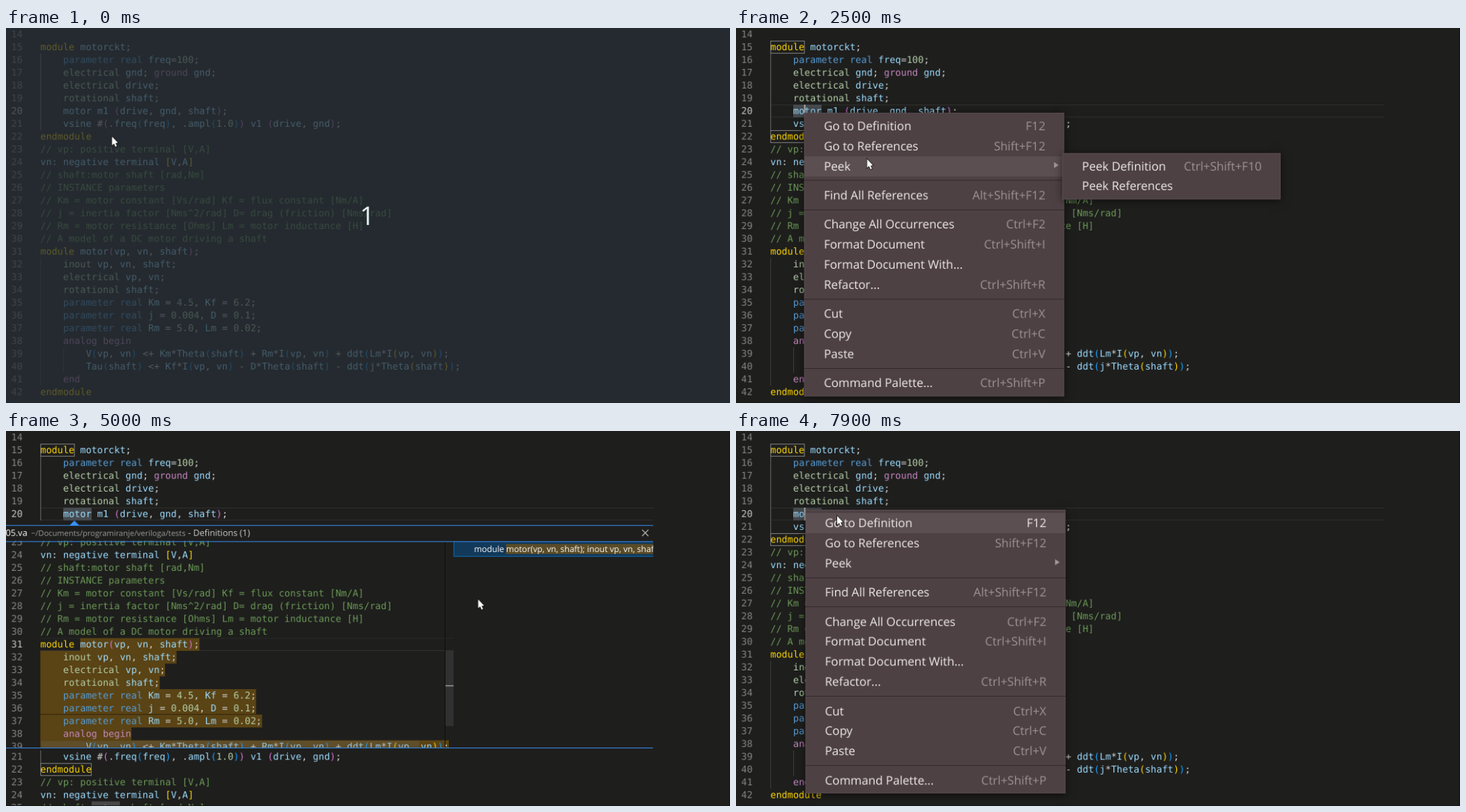
An HTML page with a canvas that plays this animation: 1038 by 539 pixels, repeating every 8 s.

```html
<!DOCTYPE html>
<html lang="en">
<head>
<meta charset="utf-8">
<title>Peek definition</title>
<style>
html, body { margin: 0; width: 100%; height: 100%; overflow: hidden; background: #1e1e1d; }
canvas { display: block; }
</style>
</head>
<body>
<canvas id="stage" width="1038" height="539"></canvas>
<script>
// The screen is painted at its native size, then scaled down to the stage.
const view = document.getElementById('stage').getContext('2d');
const screen = document.createElement('canvas');
const ctx = screen.getContext('2d');
const W = 1038, H = 539, LOOP = 8000;
const LH = 18.36, SCALE = 19 / LH;
screen.width = Math.round(W * SCALE);
screen.height = Math.round(H * SCALE);

const BG = '#1e1e1d', CW = 8.139, X0 = 49.3, FIRST = 14;
const MONO = '13.52px "DejaVu Sans Mono", monospace';
const sans = size => size + 'px "Open Sans", "Noto Sans", sans-serif';
const BRACKETS = ['#ffd700', '#da70d6', '#179fff'];
const BLUE = '#3794ff';

const LINES = `
module motorckt;
    parameter real freq=100;
    electrical gnd; ground gnd;
    electrical drive;
    rotational shaft;
    motor m1 (drive, gnd, shaft);
    vsine #(.freq(freq), .ampl(1.0)) v1 (drive, gnd);
endmodule
// vp: positive terminal [V,A]
vn: negative terminal [V,A]
// shaft:motor shaft [rad,Nm]
// INSTANCE parameters
// Km = motor constant [Vs/rad] Kf = flux constant [Nm/A]
// j = inertia factor [Nms^2/rad] D= drag (friction) [Nms/rad]
// Rm = motor resistance [Ohms] Lm = motor inductance [H]
// A model of a DC motor driving a shaft
module motor(vp, vn, shaft);
    inout vp, vn, shaft;
    electrical vp, vn;
    rotational shaft;
    parameter real Km = 4.5, Kf = 6.2;
    parameter real j = 0.004, D = 0.1;
    parameter real Rm = 5.0, Lm = 0.02;
    analog begin
        V(vp, vn) <+ Km*Theta(shaft) + Rm*I(vp, vn) + ddt(Lm*I(vp, vn));
        Tau(shaft) <+ Kf*I(vp, vn) - D*Theta(shaft) - ddt(j*Theta(shaft));
    end
endmodule`.split('\n');

const MENU = [
  ['Go to Definition', 'F12'], ['Go to References', 'Shift+F12'], ['Peek', '>'], null,
  ['Find All References', 'Alt+Shift+F12'], null,
  ['Change All Occurrences', 'Ctrl+F2'], ['Format Document', 'Ctrl+Shift+I'],
  ['Format Document With...', ''], ['Refactor...', 'Ctrl+Shift+R'], null,
  ['Cut', 'Ctrl+X'], ['Copy', 'Ctrl+C'], ['Paste', 'Ctrl+V'], null,
  ['Command Palette...', 'Ctrl+Shift+P']
];
const SUBMENU = [['Peek Definition', 'Ctrl+Shift+F10'], ['Peek References', '']];

// pointer: time, x, y
const PATH = [
  [0, 152, 156], [600, 112, 156], [800, 112, 156], [1000, 98, 122], [1700, 98, 122],
  [2200, 168, 187], [2400, 168, 187], [2900, 360, 200], [3300, 485, 199], [3900, 485, 199],
  [4400, 188, 342], [4500, 188, 342], [5000, 677, 242], [5400, 887, 166], [5900, 914, 143],
  [6100, 914, 143], [6200, 911, 150], [6400, 911, 150], [6900, 36, 118], [7300, 104, 108],
  [7500, 104, 108], [7600, 98, 114], [7800, 98, 114], [7900, 145, 122]
];

function pointerAt(t) {
  const i = PATH.findIndex(p => p[0] > t);
  if (i < 0) return PATH[PATH.length - 1].slice(1);
  const [t0, x0, y0] = PATH[i - 1], [t1, x1, y1] = PATH[i];
  let k = (t - t0) / (t1 - t0);
  k = k * k * (3 - 2 * k);
  return [x0 + (x1 - x0) * k, y0 + (y1 - y0) * k];
}

const snap = v => Math.round(v * SCALE) / SCALE;

function rect(x, y, w, h, color) {
  const left = snap(x), top = snap(y), px = 1 / SCALE;
  ctx.fillStyle = color;
  ctx.fillRect(left, top, Math.max(snap(x + w) - left, px), Math.max(snap(y + h) - top, px));
}

function outline(x, y, w, h, color) {
  rect(x, y, w, .9, color);
  rect(x, y + h - 1, w, .9, color);
  rect(x, y, .9, h, color);
  rect(x + w - 1, y, .9, h, color);
}

function text(str, x, y, color, font, align = 'left') {
  ctx.font = font;
  ctx.textAlign = align;
  ctx.fillStyle = color;
  ctx.fillText(str, x, y);
}

function poly(points, color, edge) {
  ctx.beginPath();
  points.forEach(([x, y]) => ctx.lineTo(x, y));
  ctx.closePath();
  if (edge) {
    ctx.strokeStyle = edge;
    ctx.lineWidth = 1.6;
    ctx.stroke();
  }
  ctx.fillStyle = color;
  ctx.fill();
}

function strokePath(d, color, width) {
  ctx.strokeStyle = color;
  ctx.lineWidth = width;
  ctx.stroke(new Path2D(d));
}

function clipTo(x, y, w, h) {
  ctx.save();
  ctx.beginPath();
  ctx.rect(x, y, w, h);
  ctx.clip();
}

const lineTop = n => (n - FIRST) * LH;

function tokenColor(s) {
  if (s.startsWith('//')) return '#6a9955';
  if (/^(end)?module$/.test(s)) return '#ffd700';
  if (/^(parameter|real)$/.test(s)) return '#569cd6';
  if (/^(ground|analog|begin|end)$/.test(s)) return '#c586c0';
  if (/^(electrical|rotational|inout|\d.*)$/.test(s)) return '#b5cea8';
  return /^\w/.test(s) ? '#9cdcfe' : '#d4d4d4';
}

function drawGuides(n, top) {
  if (n > 15 && n < 22) rect(X0, top, .9, LH, '#6c6c6c');
  if (n > 31 && n < 42) rect(X0, top, .9, LH, '#404040');
  if (n === 39 || n === 40) rect(X0 + 4 * CW, top, .9, LH, '#404040');
}

function drawCode(n, top, active) {
  const base = top + 14 / SCALE;
  let depth = n === 39 || n === 40 ? 2 : n === 24 ? 0 : 1;
  text(n, 7.6, base, n === active ? '#c6c6c6' : '#858585', MONO);
  for (const m of LINES[n - FIRST].matchAll(/\/\/.*|\d[\d.]*|\w+|[()[\]]|[^\w\s()[\]]+/g)) {
    const s = m[0];
    let color = tokenColor(s);
    if (/^[)\]]$/.test(s)) depth--;
    if (/^[()[\]]$/.test(s)) color = BRACKETS[depth % 3];
    if (/^[([]$/.test(s)) depth++;
    text(s, X0 + m.index * CW, base, color, MONO);
  }
}

function drawEditor(t, peek) {
  const topOf = n => lineTop(n) + (peek && n > 20 ? 18 * LH : 0);
  if (t >= 600) {
    rect(X0, 110, 879, .9, '#303030');
    rect(X0, 127.6, 879, .9, '#303030');
  }
  for (let n = FIRST; n <= 42; n++) {
    const top = topOf(n);
    if (top > H) break;
    drawGuides(n, top);
    if (t >= 1200)
      for (const m of LINES[n - FIRST].matchAll(/\bmotor\b/g))
        rect(X0 + m.index * CW, top, 5 * CW, LH, n === 20 ? '#464b50' : '#474747');
    drawCode(n, top, 20);
  }
  if (t >= 900) {
    outline(X0, topOf(15), 6 * CW, LH, '#888');
    outline(X0, topOf(22), 9 * CW, LH, '#888');
  }
  const caret = t >= 1200 && t < 1400 || t >= 2000 && t < 3600 && t % 1000 < 600 ||
    t >= 6100 && (t - 6100) % 1000 < 500 || t >= 7600;
  if (caret) rect(98, 110, 2, LH, '#aeafad');
}

function drawFolds(t) {
  if (t < 6800 || t >= 7300) return;
  ctx.globalAlpha = t < 7000 ? (t - 6700) / 300 : (7300 - t) / 400;
  for (const n of [15, 31, 38]) {
    const y = lineTop(n) + 7;
    strokePath(`M30 ${y}l4.5 4.5l4.5 -4.5`, '#c5c5c5', 1.2);
  }
  ctx.globalAlpha = 1;
}

function drawPeek(t, mx, my) {
  rect(0, 128.5, 928, 330.5, BG);
  poly([[91.5, 135.3], [98, 128.8], [104.5, 135.3]], BLUE);
  text('05.va', -.5, 150.5, '#fff', sans(12.6));
  text('~/Documents/programiranje/veriloga/tests', 36, 150.5, '#9a9a9a', sans(11.1));
  text('- Definitions (1)', 261, 150.5, '#ccc', sans(12.6));
  if (mx > 905 && my < 158) rect(906, 136, 21, 21, '#303132');
  strokePath('M912 142l9 9M921 142l-9 9', '#c5c5c5', 1.1);

  clipTo(0, 158, 642, 297);
  rect(X0, 297.5, 593, .9, '#282828');
  rect(X0, 315, 593, .9, '#303030');
  for (let n = 23; n < 40; n++) {
    const top = lineTop(n) - 15 / SCALE, len = LINES[n - FIRST].length;
    const start = n === 31 ? 7 : 0;
    drawGuides(n, top);
    if (n > 30) rect(X0 + start * CW, top, (len - start) * CW, LH, '#5a4314');
    drawCode(n, top, 31);
  }
  rect(X0, 407, 318, .9, '#2e230c');
  rect(629, 158, .9, 297, '#0c0c0c');
  ctx.globalAlpha = t < 5300 ? 1 : Math.max(0, 1 - (t - 5300) / 600);
  rect(50, 445, 542, 10, 'rgba(121,121,121,.22)');
  rect(630, 316, 12, 108, 'rgba(121,121,121,.22)');
  ctx.globalAlpha = 1;
  rect(630, 365, 12, 2, '#858585');
  ctx.restore();

  clipTo(641, 158, 287, 297);
  rect(641.5, 158.5, 290, 22.5, '#12395a');
  outline(641.5, 158.5, 290, 22.5, '#0e6fb8');
  rect(717, 162, 211, 15, '#5a4b26');
  text('module', 671, 173.8, '#fff', sans(12.1));
  text('motor(vp, vn, shaft); inout vp, vn, shaft;', 717, 173.8, '#fff', sans(12.1));
  ctx.restore();
  for (const y of [135, 158, 455]) rect(0, y, 928, .9, BLUE);
}

function drawMenu(items, x, y, w, h, hover) {
  ctx.save();
  ctx.shadowColor = 'rgba(0,0,0,.55)';
  ctx.shadowBlur = 12;
  ctx.shadowOffsetY = 2;
  rect(x, y, w, h, '#4e4144');
  ctx.restore();
  outline(x, y, w, h, '#594c4f');
  let top = y + 4.5;
  for (const item of items) {
    if (!item) {
      rect(x, top + 5.5, w, .9, '#30272a');
      top += 12.9;
      continue;
    }
    const on = hover(top, item[0]), base = top + 20.4;
    if (on) rect(x + 1, top, w - 2, 28.9, '#5c4f52');
    text(item[0], x + 28, base, '#eeeaea', sans(17));
    if (item[1] === '>') poly([[x + 358, top + 8.5], [x + 364.5, top + 12.8], [x + 358, top + 17]], '#a2989a');
    else text(item[1], x + w - 27.5, base, on ? '#eeeaea' : '#9d9395', sans(17), 'right');
    top += 28.9;
  }
}

function drawMenus(t, mx, my) {
  const first = t >= 1600 && t < 3400;
  if (!first && t < 7600) return;
  const sub = first && t >= 2200;
  const over = top => my >= top && my < top + 28.9;
  const x = first ? 98 : 99.5, y = first ? 122 : 113.5;
  drawMenu(MENU, x, y, 373, 407.5, (top, name) => sub ? name === 'Peek' : over(top));
  if (sub) drawMenu(SUBMENU, 468, 179.5, 313, 66.5, top => mx > 468 && over(top));
}

function drawPointer(t, x, y, peek) {
  const menu = t >= 1600 && t < 3400 || t >= 7600;
  const arrow = t < 600 || menu || x < 44 || peek && (x > 630 || y < 158);
  if (arrow) {
    const shape = [[0, 0], [0, 12.6], [2.9, 10.1], [4.9, 14.8], [6.9, 13.9], [5, 9.4], [8.4, 9]];
    poly(shape.map(([a, b]) => [x + a, y + b]), '#fff', '#111');
    return;
  }
  const d = `M${x - 3} ${y - 6}h6M${x - 3} ${y + 6}h6M${x} ${y - 6}v12`;
  strokePath(d, '#111', 2.6);
  strokePath(d, '#fff', 1.2);
}

function drawCountdown(t) {
  if (t >= 600) return;
  ctx.globalAlpha = 1 - t / 600;
  rect(0, 0, W, H, 'rgba(39,46,54,.74)');
  text('1', 518, 283, '#e8f6f6', sans(37), 'center');
  ctx.globalAlpha = 1;
}

function draw(now) {
  const t = Math.floor(now % LOOP / 100) * 100;
  const peek = t >= 3600 && t < 6100;
  const [mx, my] = pointerAt(t);
  ctx.setTransform(SCALE, 0, 0, SCALE, 0, 0);
  ctx.textRendering = 'geometricPrecision';
  rect(0, 0, W, H, BG);
  drawEditor(t, peek);
  drawFolds(t);
  if (peek) drawPeek(t, mx, my);
  rect(1037, 0, 1, H, '#121212');
  rect(0, 538, W, 1, '#121212');
  drawMenus(t, mx, my);
  drawCountdown(t);
  drawPointer(t, mx, my, peek);
  view.imageSmoothingQuality = 'high';
  view.drawImage(screen, 0, 0, screen.width / SCALE, screen.height / SCALE);
}

const begin = performance.now();
function tick() {
  draw(performance.now() - begin);
  requestAnimationFrame(tick);
}
tick();
</script>
</body>
</html>
```
